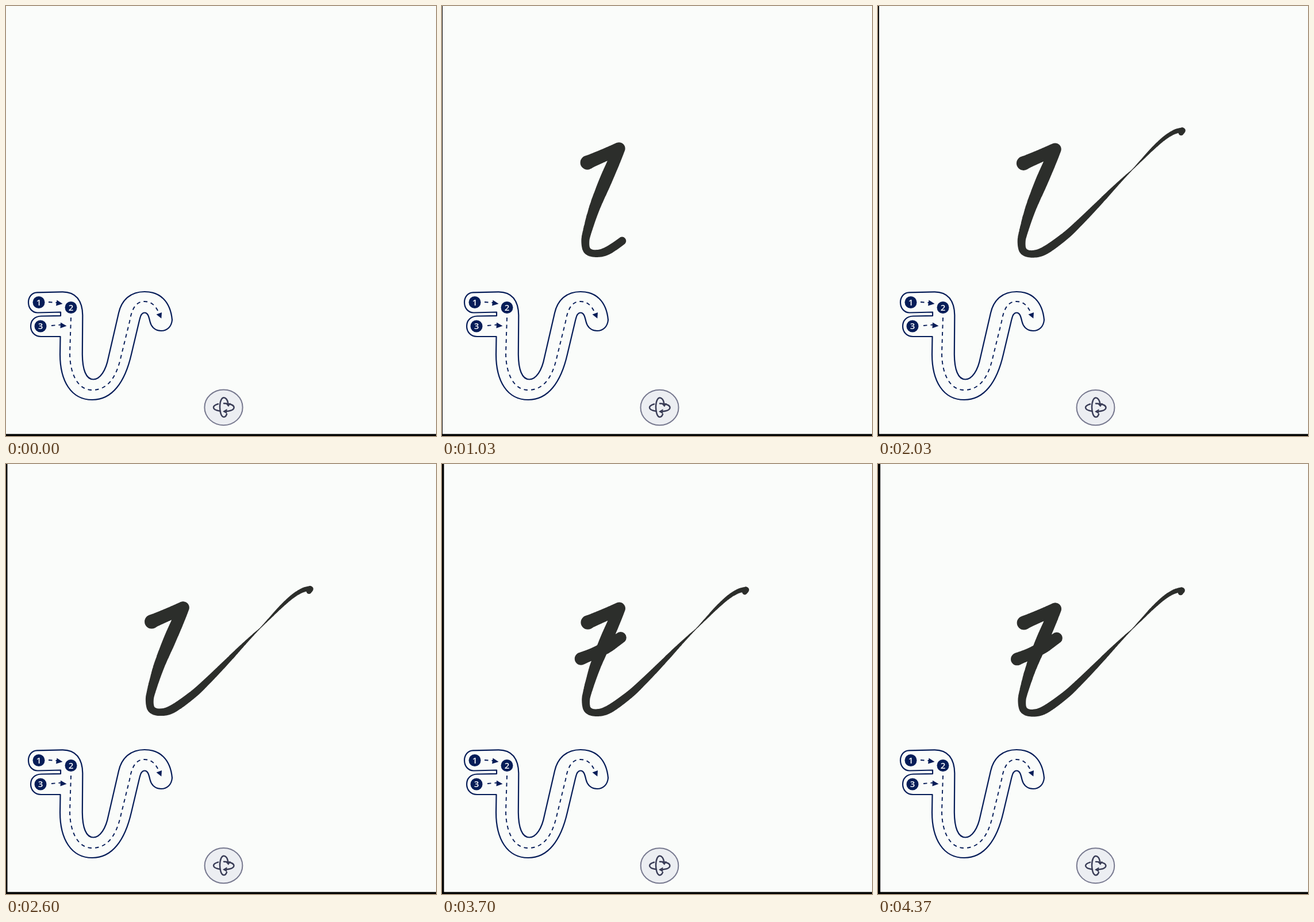
These frames come from a looping animation (748 by 748 pixels, 4.41 s). An HTML page with a canvas:

```html
<!DOCTYPE html>
<html lang="en">
<head>
<meta charset="utf-8">
<title>Letter tracing</title>
<style>
  html, body { margin: 0; width: 100%; height: 100%; overflow: hidden; background: #fafcfa; }
  canvas, svg { position: absolute; left: 0; top: 0; width: 748px; height: 748px; }
  .line { fill: none; stroke: #061d58; stroke-width: 2.2; stroke-linejoin: round; }
  .dash { fill: none; stroke: #061d58; stroke-width: 1.9; stroke-dasharray: 6.5 6; }
  .solid { fill: #061d58; }
  text { fill: #fff; font: 600 15px "Open Sans", "Noto Sans", sans-serif; text-anchor: middle; }
  .icon { fill: none; stroke: #3a3d57; stroke-width: 2.5; stroke-linecap: round; }
  .tip { fill: #3a3d57; }
</style>
</head>
<body>
<canvas id="paper" width="748" height="748"></canvas>
<svg viewBox="0 0 748 748">
  <g id="button">
    <ellipse cx="378.5" cy="698.5" rx="33" ry="30.7" fill="#eceef2" stroke="#77798f" stroke-width="2"/>
    <path class="icon" d="M386 690C385 685 382 681.500 379 681.500C375 681.500 372 688 372 698C372 708 375 715 379 715C381 715 383 713 384 710"/>
    <path class="icon" d="M369 692.500C364 694 361 696 361 698.500C361 702 366 704 373 705M380 705.500C390 705 396.500 702.500 396.500 698.500C396.500 695 391 692 379 691.500"/>
    <path class="tip" d="M382 692L391 691L387 697.500ZM384.500 701L384 709.500L377 705.500Z"/>
  </g>
  <path class="line" d="M95 532.500L55 533.500C45 533.500 39 525 39 515.500C39 506 45 498.500 54 498.300L98 497.300
    C121 497 133 512 133.300 538L132.800 606C133 632 139 649.500 152 649.500C164 649.500 174 633 178 612
    L196 534C201 511 217 497 241 497C268 497 286 514 289 546C288 558 280 565 270 565C260 565 253 559 250.500 549
    C248 538 246 533.500 241 533.500C236 533.500 234 538 232.500 545L218 606C207 654 185 685 150 685
    C113 685 94 652 94 606L94.500 575L61 575C50 575 43 567 43 557C43 547 50 539.700 61 539.500L95 538.800Z"/>
  <path class="dash" d="M113 542L111 604C111 638 124 668 150 668C177 668 192 646 200 610L215 549C219 526 226 514 241 514C253 514 260 521 266 534"/>
  <path class="dash" d="M74 515L88 516M79 556L95 554.500"/>
  <path class="solid" d="M88.500 511.500L98.500 518L87 521.500ZM95 550.500L105.500 556.500L94.500 560.500ZM261.500 536.500L271 533L270.300 543.500Z"/>
  <g id="marks"></g>
</svg>
<script>
const LOOP = 4410, SIZE = 748, FLOOR = 744.5, MID = 374, POSE = 1530;
const ctx = document.getElementById('paper').getContext('2d');
const button = document.getElementById('button');

document.getElementById('marks').innerHTML = [[57, 515.5], [113, 524.5], [60, 557]]
  .map(([x, y], i) => `<circle class="solid" cx="${x}" cy="${y}" r="10.5"/><text x="${x}" y="${y + 5.3}">${i + 1}</text>`)
  .join('');

// Pen strokes: points are x, y, radius
const strokes = [
  { from: 150, to: 480, ease: 1, pts: [[253, 273, 12.3], [262, 269, 11.5], [285, 259, 11], [308, 248.500, 10.7]] },
  { from: 530, to: 1400, ease: 1.4, pts: [
    [308, 248.500, 10.7], [300, 269, 10.7], [284, 306, 11], [266, 350, 9.5], [253.500, 390, 7.8], [249.500, 410, 7],
    [253, 426, 6.6], [268, 431, 6.3], [290, 425, 7.3], [325, 400, 6.8], [350, 377, 6], [380, 347, 4.8],
    [410, 316, 2.9], [430, 296, 1.6], [443, 283.500, 0.8], [460, 266, 1.7], [480, 245.500, 2.7],
    [500, 228, 3.3], [517, 218, 3.9], [530, 215.500, 4.6], [527.500, 220, 4.6]] },
  { from: 2670, to: 3000, ease: 1, pts: [[241, 336.500, 11], [264, 327, 10.3], [286, 316, 11], [310.500, 299.500, 10]] }
];

function spline(a, b, c, d, u) {
  return b + u / 2 * (c - a + u * (2 * a - 5 * b + 4 * c - d + u * (3 * (b - c) + d - a)));
}

// Evenly spaced dots along the curve
function sample(pts) {
  const dots = [];
  for (let i = 0; i + 1 < pts.length; i++) {
    const a = pts[Math.max(i - 1, 0)], b = pts[i], c = pts[i + 1], d = pts[Math.min(i + 2, pts.length - 1)];
    const n = Math.ceil(Math.hypot(c[0] - b[0], c[1] - b[1]));
    for (let j = 0; j < n; j++) dots.push(b.map((_, k) => spline(a[k], b[k], c[k], d[k], j / n)));
  }
  dots.push(pts[pts.length - 1]);
  return dots;
}
strokes.forEach(s => s.dots = sample(s.pts));

const zoom = t => 1 - 0.011 * t / LOOP;

function draw(t) {
  const z = zoom(t), s = z / zoom(POSE);
  ctx.setTransform(1, 0, 0, 1, 0, 0);
  ctx.fillStyle = '#fafcfa';
  ctx.fillRect(0, 0, SIZE, SIZE);
  ctx.fillStyle = '#000';
  ctx.fillRect(0, FLOOR, SIZE, SIZE - FLOOR);
  ctx.fillRect(0, 0, MID * (1 - z), SIZE);

  const dx = MID * (1 - s), dy = FLOOR * (1 - s);
  ctx.setTransform(s, 0, 0, s, dx, dy);
  ctx.fillStyle = '#2c2e2b';
  ctx.beginPath();
  for (const { from, to, ease, dots } of strokes) {
    if (t < from) continue;
    const p = Math.min((t - from) / (to - from), 1) ** ease;
    const count = Math.max(1, Math.round(p * dots.length));
    for (let i = 0; i < count; i++) {
      const [x, y, r] = dots[i];
      ctx.moveTo(x + r, y);
      ctx.arc(x, y, r, 0, 2 * Math.PI);
    }
  }
  ctx.fill();
  button.setAttribute('transform', `matrix(${s} 0 0 ${s} ${dx} ${dy})`);
}

const start = performance.now();
function tick() {
  draw((performance.now() - start) % LOOP);
  requestAnimationFrame(tick);
}
tick();
</script>
</body>
</html>
```
